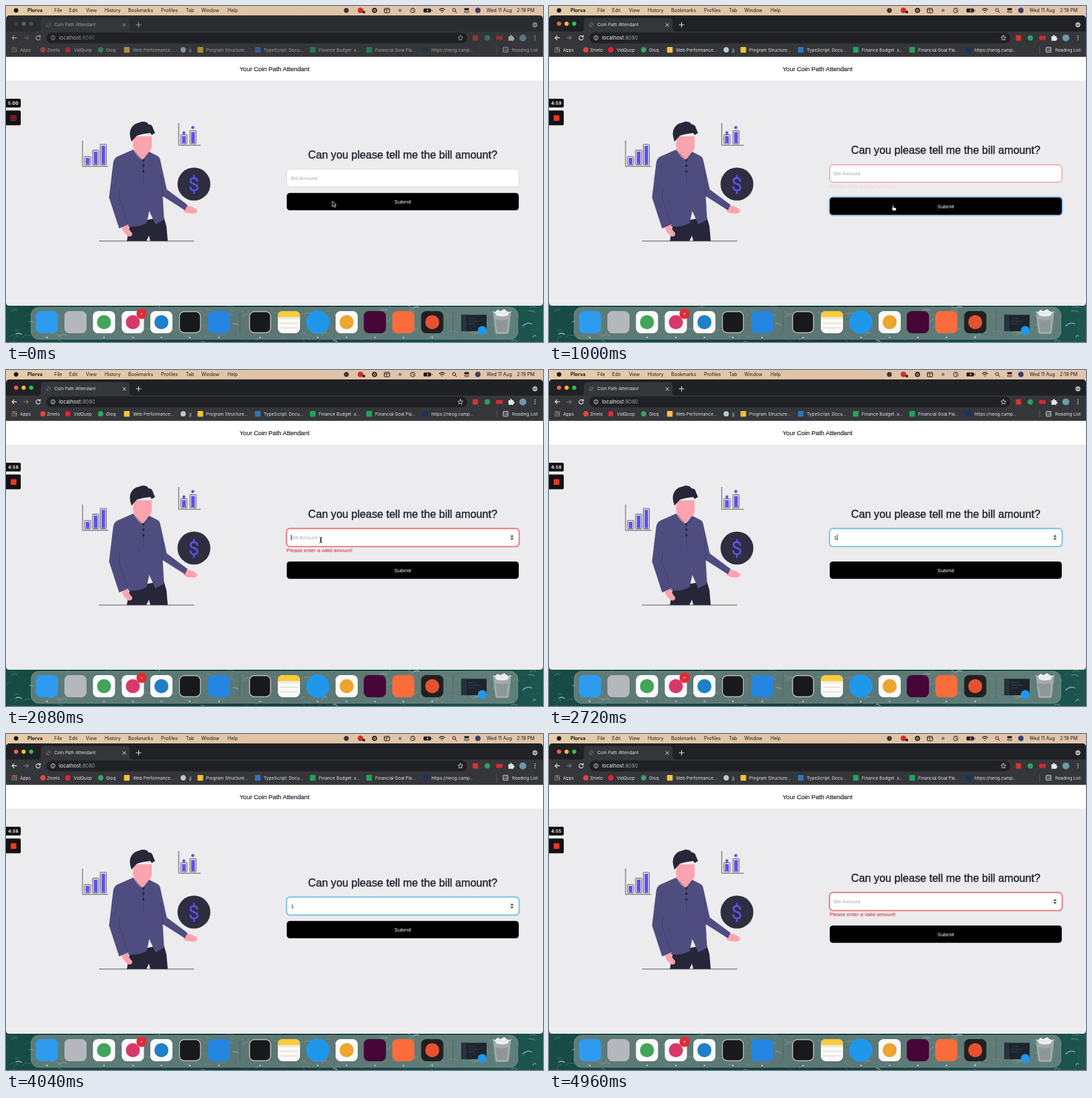
An HTML page for the animation above (5 s loop, 800 by 500 pixels).

```html
<!DOCTYPE html>
<html lang="en">
<head>
<meta charset="utf-8">
<title>Bill form demo</title>
<style>
  html, body { margin: 0; width: 800px; height: 500px; overflow: hidden; background: #123c38; }
  svg { display: block; }
  .ui { font-family: Inter, sans-serif; }
  .page { font-family: "Liberation Sans", Arial, sans-serif; font-size: 7.9px; }
  .line { fill: none; stroke-linecap: round; stroke-linejoin: round; }
  text { white-space: pre; }
</style>
</head>
<body>
<svg id="stage" width="800" height="500" viewBox="0 0 800 500"></svg>
<script>
const LOOP = 5000;
const stage = document.getElementById('stage');

let seed = 11;
const random = () => (seed = seed * 16807 % 2147483647) / 2147483647;

const rect = (x, y, w, h, fill, r = 0, more = '') =>
  `<rect x="${x}" y="${y}" width="${w}" height="${h}" rx="${r}" fill="${fill}" ${more}/>`;
const circle = (x, y, r, fill, more = '') => `<circle cx="${x}" cy="${y}" r="${r}" fill="${fill}" ${more}/>`;
const text = (x, y, str, size, fill, more = '') =>
  `<text x="${x}" y="${y}" font-size="${size}" fill="${fill}" ${more}>${str}</text>`;
const line = (d, stroke, width = 1, more = '') =>
  `<path class="line" d="${d}" stroke="${stroke}" stroke-width="${width}" ${more}/>`;
const shape = (d, fill, more = '') => `<path d="${d}" fill="${fill}" ${more}/>`;
const MIDDLE = 'text-anchor="middle"';

function ocean() {
  let out = rect(0, 430, 800, 70, 'url(#sea)');
  for (let i = 0; i < 260; i++) {
    const x = random() * 800, y = 444 + random() * 56, w = 3 + random() * 11;
    const rise = random() * 8 - 4;
    out += line(`M${x} ${y}q${w / 2} ${rise - 3} ${w} ${rise}`, random() < .4 ? '#cfdfda' : '#3f7a70',
      .4 + random() * 1.2, `opacity="${.2 + random() * .5}"`);
  }
  return out;
}

function menuBar() {
  const items = [[72, 'File'], [94, 'Edit'], [119, 'View'], [147, 'History'], [182, 'Bookmarks'],
    [231, 'Profiles'], [268, 'Tab'], [291, 'Window'], [330, 'Help']];
  const ink = '#1c1816';
  return `<g class="ui">${rect(0, 0, 800, 20, 'url(#menu)')}
    ${circle(15, 6.6, 3.3, ink)}${text(32, 9.3, 'Plorva', 7.2, ink, 'font-weight="700"')}
    ${items.map(([x, s]) => text(x, 9.3, s, 7, ink)).join('')}
    ${circle(507, 6.6, 3.6, '#3b3532')}
    ${circle(528, 6.6, 4, '#d22b2b')}${circle(533, 9, 2, ink)}
    ${circle(549, 6.6, 3, 'none', `stroke="${ink}" stroke-width="1.6"`)}${circle(549, 6.6, 1.2, ink)}
    ${rect(563.5, 3.5, 8, 6.5, 'none', 1, `stroke="${ink}"`)}${line('M563.5 5.5h8M567 5.5v4', ink, .8)}
    ${circle(587, 6.6, 2.4, '#8d7b6d')}
    ${circle(606, 6.6, 3.4, 'none', `stroke="${ink}" stroke-width=".9"`)}${line('M606 4.6v2l1.5 1', ink, .8)}
    ${rect(622, 3.8, 11, 5.8, ink, 1.4)}${rect(634, 5.7, 1, 2, ink)}${shape('M628.6 4.3l-2.2 2.8h1.6l-.5 2.2 2.2-3h-1.5z', '#e3d0b5')}
    ${line('M645.5 5.4q4-3.6 8 0M647.2 7.2q2.3-2 4.6 0', ink, 1.1)}${circle(649.5, 9, .8, ink)}
    ${circle(667.5, 6, 2.3, 'none', `stroke="${ink}" stroke-width=".9"`)}${line('M669.3 7.9l2 2', ink, 1)}
    ${rect(682.5, 3.3, 7.5, 2.8, ink, 1.4)}${rect(682.9, 7.4, 6.7, 2.3, 'none', 1.2, `stroke="${ink}" stroke-width=".8"`)}
    ${circle(703, 6.6, 4, '#3a3f72')}
    ${text(716, 9.3, 'Wed 11 Aug', 7, ink)}${text(761, 9.3, '2:19 PM', 7, ink)}</g>`;
}

function browser() {
  const pale = '#e4e6e9', grey = '#9aa0a6';
  const bookmarks = [[55, '#e0483c', 61, 'Zmelo', 1], [92, '#f2203a', 101, 'VidQuop', 1], [141, '#35a665', 149, 'Gloq', 1],
    [180, '#f4c245', 189, 'Web Performance...'], [264, '#b9cbd8', 273, 'jj', 1], [289.5, '#f0c22c', 298, 'Program Structure...'],
    [375, '#2f74c0', 384, 'TypeScript: Docu...'], [457, '#20a35a', 466, 'Finance Budget .x...'],
    [541, '#20a35a', 550, 'Financial Goal Pla...'], [625, '#17345f', 634, 'https://neog.camp...']];
  let grid = '';
  for (let i = 0; i < 9; i++)
    grid += rect(8.5 + i % 3 * 2.9, 61.5 + Math.floor(i / 3) * 2.9, 1.9, 1.9, ['#e8574a', '#eab83c', '#4a9a63', '#4f87e0'][i % 4]);
  return `${rect(0, 14, 800, 432, '#202124', 5, 'id="frame"')}
    ${shape('M47 38q5 0 5-5v-10q0-5 5-5h122q5 0 5 5v10q0 5 5 5z', '#35363a')}
    ${rect(0, 38, 800, 38, '#35363a')}${rect(60, 39.5, 627, 16, '#202124', 8)}
    <g id="lights">${circle(15, 26.3, 3.1, '#ff5f57')}${circle(26.3, 26.3, 3.1, '#febc2e')}${circle(37.5, 26.3, 3.1, '#28c840')}</g>
    <g class="ui" id="toolbar">
    ${circle(63, 28, 3.7, '#54575b')}${line('M60 27l2-1 1 2 2 1-1 2', '#2a2b2e', 1)}
    ${text(72, 30.4, 'Coin Path Attendant', 6.5, pale)}
    ${line('M174 26l4.4 4.4m0-4.4l-4.4 4.4', pale, .9)}${line('M194 28h7m-3.5-3.5v7', pale, 1)}
    ${circle(788, 28, 3.7, '#b6b8bb')}${line('M786.2 27.4l1.8 1.7 1.8-1.7', '#202124', .9)}
    ${line('M15.7 47.4h-6.7m3-3l-3 3 3 3', pale, 1.1)}${line('M26.7 47.4h6.7m-3-3l3 3-3 3', grey, 1.1, 'opacity=".6"')}
    ${line('M50.3 45.2a3.2 3.2 0 1 0 .8 2.8M51 43.6v2.4h-2.5', pale, 1.1)}
    ${circle(70, 47.4, 3.1, 'none', `stroke="${pale}" stroke-width=".8"`)}${line('M70 47.2v1.8M70 45.7v.1', pale, .9)}
    ${text(79, 50, `localhost<tspan fill="${grey}">:8080</tspan>`, 7.6, '#f1f3f4')}
    ${line('M677 43.8l1.1 2.4 2.6.3-1.9 1.8.5 2.5-2.3-1.2-2.3 1.2.5-2.5-1.9-1.8 2.6-.3z', pale, .8)}
    ${rect(695.3, 43.5, 8, 8, '#d9342b', 1)}${circle(717, 47.4, 4, '#2e9e63')}${rect(730, 44.5, 10, 6, '#d72a2f', 2)}
    ${shape('M748.5 45h2.4q-.3-2 1.3-2t1.3 2h2.5v2.4q1.8-.2 1.8 1.2t-1.8 1.2v2h-7.5z', pale)}
    ${circle(770, 47.4, 5.2, '#6c9aab')}
    ${[44.5, 47.4, 50.3].map(y => circle(788, y, .8, pale)).join('')}
    ${grid}${text(21, 67.7, 'Apps', 6.6, pale)}
    ${bookmarks.map(([icon, fill, x, s, round]) =>
      (round ? circle(icon, 65.2, 3.9, fill) : rect(icon - 4.2, 61, 8.4, 8.4, fill, 1)) + text(x, 67.7, s, 6.55, pale)).join('')}
    ${line('M731 60.5v10', '#5f6368', .8)}${rect(740.7, 61.5, 7.2, 7.4, 'none', .6, `stroke="${pale}" stroke-width=".9"`)}
    ${line('M742 64h.5M744 64h2.5M742 66.5h.5M744 66.5h2.5', pale, .8)}${text(754, 67.7, 'Reading List', 6.6, pale)}
    </g>
    ${rect(0, 75.7, 800, 36, '#fff')}${shape('M0 111h800v330q0 5-5 5h-790q-5 0-5-5z', '#ecebed')}
    <g class="page">${text(400, 96.8, 'Your Coin Path Attendant', 9.3, '#1a202c', `${MIDDLE} stroke="#1a202c" stroke-width=".2"`)}</g>`;
}

function illustration() {
  const dark = '#272638', cloth = '#4f4d7f', skin = '#fba3ae', violet = '#5e50ea';
  const bar = (x, y, w, bottom) => rect(x, y, w, bottom - y, 'none', .8, 'stroke="#34334a" stroke-width=".8"')
    + rect(x + 1.8, y + 2, w - 3.6, bottom - y - 3, violet);
  return `${line('M139 349.8h141', '#4a4957', .9)}
    ${line('M114 200.5v38.2h38M257.3 174.5v32.7h32.5', '#4a4957', .9)}
    ${bar(117, 224, 9, 236.5)}${bar(129, 214.5, 9, 236.5)}${bar(140.5, 206, 9, 236.5)}
    ${bar(260.5, 191.5, 9.2, 205)}${bar(274, 185.5, 9.2, 205)}
    ${circle(265, 188.7, 2.2, violet)}${circle(278.3, 180.8, 2.3, violet)}
    ${shape('M180 349.8l5-27 50-9 4 14 2 22h-26l-2-8-4 8z', dark)}
    ${shape('M172 329l9-4q1 7 7 13 1 5-5 5-7-3-11-14z', skin)}
    ${shape('M266 300l5-3q10 2 14 7 0 5-7 5t-13-3z', skin)}
    ${shape('M191 194h26v15q0 5-3 7l2 5q-4 8-10 9-9-3-15-15l-2-8z', skin)}
    ${shape('M191 213l-25 11q-6 3-6.5 11l-6 50 15 46 14-6-1 3q16 2 28-5l4-18 9 20 13-7-2-35 33 21 4-8-31-23-10-45q-1-4-6-6l-10-5-2 2q-6 9-9 10-7-5-13-15z', cloth)}
    ${line('M170 271l-2 13 13 39M190 215l14 15 11-11M204 230l1 35M231 250l3 33', '#393861', .7)}
    ${[229.5, 237.5, 246].map(y => circle(204.7, y, 1.7, dark)).join('')}
    ${shape('M187 202q-5-14 0-21 4-6 10-7l6-2q8 0 9 4 6 0 7 6l3 7-5 3-2-3q-12 1-20 4-4 4-8 9z', dark)}
    ${circle(280, 265, 24.5, '#2f2e41')}
    ${line('M285 260.5q-1-4.3-5-4.3-5 0-5 4 0 3.3 5 4.7 5.3 1.5 5.3 5 0 4.2-5.3 4.2-4.7 0-5.4-4.5M280 252.5v3.5M280 274.5v4', violet, 2.7)}`;
}

function recorder() {
  return `<g class="ui">${shape('M0 138h20q2 0 2 2v9q0 2-2 2h-20z', '#121214')}
    ${text(11, 146.8, '', 6.2, '#fff', `${MIDDLE} id="timer" font-weight="700" letter-spacing=".4"`)}
    ${shape('M0 155.5h20q2 0 2 2v18q0 2-2 2h-20z', '#121214')}
    ${rect(7, 162.5, 8.5, 8.5, '#f03524', 1, 'id="stop"')}
    ${line('M7.5 163h7.5v7.5h-7.5zM10 163v7.5M12.5 163v7.5M7.5 165.5h7.5M7.5 168h7.5', '#a82d3c', .9, 'id="starting"')}</g>`;
}

function form() {
  const ink = '#1a202c';
  return `<g class="page">
    ${text(591, 227, 'Can you please tell me the bill amount?', 16.1, ink, `id="heading" ${MIDDLE} stroke="${ink}" stroke-width=".35"`)}
    <g id="input">${rect(417.6, 242.3, 347.2, 27.4, 'none', 5.5, 'id="halo" stroke-width="1.6" opacity=".55"')}
      ${rect(418.3, 243, 345.8, 26, '#fff', 5, 'id="field" stroke-width=".9"')}
      ${text(424.6, 258.8, '', 7.9, ink, 'id="value"')}${rect(424.5, 251.5, .8, 9, '#111', 0, 'id="caret"')}
      <g id="spinner">${rect(750, 251, 7.5, 10, '#ececee', 2)}${shape('M751.8 255l2-2.8 2 2.8zM751.8 257l2 2.8 2-2.8z', '#333')}</g></g>
    ${text(418, 271.2, 'Please enter a valid amount!', 7.75, '#dc1c28', 'id="error"')}
    <g id="button">${rect(417.7, 277.7, 346.8, 26.9, 'none', 5, 'id="ring" stroke="#8fc4f2" stroke-width="2.2"')}
      ${rect(418.3, 278.3, 345.6, 25.7, '#000', 4.5)}
      ${text(591, 294, 'Submit', 8, '#fff', MIDDLE)}</g></g>`;
}

function dock() {
  const tile = (x, fill, mark) => rect(x - 16.5, 454, 33, 33, fill, 7.5) + (mark ? circle(x, 470.5, 10.5, mark) : '');
  const tiles = [[61, '#2d9bef'], [103.5, '#b4b8bd'], [146, '#fafafa', '#43a45b'], [189, '#fafafa', '#d9386a'],
    [231.5, '#fafafa', '#1f7fc9'], [274, '#17191b'], [317.5, '#2486e0'], [378.5, '#17191b'],
    [507.5, '#fafafa', '#eca52f'], [549.5, '#460638'], [592, '#fb6c3c'], [635, '#202022', '#e8512f']];
  const running = tiles.map(t => t[0]).filter(x => x !== 103.5).concat(464.5);
  return `${rect(37.5, 448.5, 725, 47.5, '#81938f', 11, 'opacity=".68" stroke="#b4c0bd" stroke-width=".7"')}
    ${tiles.map(t => tile(...t)).join('')}
    ${[274, 378.5].map(x => rect(x - 15.7, 454.8, 31.4, 31.4, 'none', 7, 'stroke="#b7babb" stroke-width="1.6"')).join('')}
    ${circle(464.5, 470.5, 17.5, '#1f98ec')}
    ${tile(421.5, '#fbfaf5')}${shape('M405 463v-2q0-7 7.5-7h18q7.5 0 7.5 7v2z', '#f8cb3a')}
    ${line('M405 465h33M408 472h27M408 479h27', '#c9c6bd', .8)}
    ${circle(202, 458, 7.7, '#e42a36')}${circle(202, 458, 1, '#fff')}
    ${line('M348.5 454v33M666 454v33', '#506460', .8)}
    ${rect(678, 459.5, 38, 24.5, '#1c242d', 1)}${rect(678, 459.5, 8, 24.5, '#28323d', 1)}
    ${line('M689 465h11M689 469h16M689 473h9', '#455462', .7)}${circle(709.5, 483, 6.8, '#1f98ec')}
    ${shape('M725.5 455h27l-3.5 31q-.5 2-3 2h-14q-2.5 0-3-2z', '#a9b0b2', 'opacity=".9"')}
    ${shape('M728 456l4-4 5 2 5-3 4 3 4 2-3 5-8 1-8-1z', '#eef0f0')}${shape('M729 466l9 2 10-2-2 19h-14z', '#7d8789', 'opacity=".55"')}
    ${line('M725.5 455q13.5 4 27 0', '#dfe3e4', 1.2)}
    ${running.map(x => circle(x, 493.3, 1, '#e4ebe9')).join('')}`;
}

const pointers = {
  arrow: shape('M0 0v8l2-1.8 1.4 3 1.5-.7-1.4-2.9h2.7z', '#111', 'stroke="#fff" stroke-width=".7"'),
  hand: shape('M-1.3 .8q0-1 .8-1t.8 1v2.3l3.3.8q1 .3.8 1.5l-.6 2.8h-4.2l-2.3-3.2q.4-1.2 1.4-.3z', '#fff', 'stroke="#111" stroke-width=".8"'),
  beam: line('M-1.7-4q1.7 0 1.7 1v6q0 1-1.7 1M1.7-4q-1.7 0-1.7 1v6q0 1 1.7 1M-1 .8h2', '#111', .9)
};

stage.innerHTML = `<defs>
  <linearGradient id="sea"><stop stop-color="#174c45"/><stop offset=".5" stop-color="#0f3a39"/><stop offset="1" stop-color="#1c564e"/></linearGradient>
  <linearGradient id="menu"><stop stop-color="#e5cda9"/><stop offset=".5" stop-color="#dfc3a6"/><stop offset="1" stop-color="#e2c5ac"/></linearGradient>
  </defs>` + ocean() + menuBar() + browser() + illustration() + recorder() + form() + dock()
  + Object.entries(pointers).map(([id, art]) => `<g id="${id}">${art}</g>`).join('');

const el = id => document.getElementById(id);
const set = (id, name, value) => el(id).setAttribute(name, value);
const show = (id, on) => set(id, 'visibility', on ? 'visible' : 'hidden');
const ramp = (t, from, to) => Math.min(1, Math.max(0, (t - from) / (to - from)));
const ease = p => p * p * (3 - 2 * p);

// Each keystroke: time and resulting field value.
const keys = [[2650, '1'], [3000, '12'], [3450, '1'], [4400, '']];
const ACTIVATE = 600, SUBMIT = 930, FOCUS = 2000, RELAYOUT = 2800;

function draw(t) {
  const active = t >= ACTIVATE, focused = t >= FOCUS;
  const [keyTime, value] = keys.filter(k => k[0] <= t).pop() || [FOCUS, ''];
  const invalid = t >= SUBMIT && value === '';
  const expanded = (t >= SUBMIT && t < RELAYOUT) || t >= keys[3][0];

  set('frame', 'fill', active ? '#202124' : '#2b2c2f');
  set('toolbar', 'opacity', active ? 1 : .62);
  set('lights', 'style', active ? '' : 'filter:grayscale(1) brightness(.5)');
  el('timer').textContent = t < 850 ? '5:00' : '4:' + (59 - Math.floor((t - 850) / 1000));
  show('starting', t < 400);
  show('stop', t >= 400);

  const shift = expanded ? 6.7 : 0;
  set('heading', 'transform', `translate(0 ${-shift})`);
  set('input', 'transform', `translate(0 ${-shift})`);
  set('button', 'transform', `translate(0 ${shift})`);
  show('ring', t >= SUBMIT && !focused);
  show('halo', focused);
  set('halo', 'stroke', invalid ? '#e8343e' : '#4fa9dc');
  set('field', 'stroke', invalid ? '#ea6b72' : focused ? '#63b3e4' : '#dcdfe5');
  show('spinner', focused);
  el('value').textContent = value || 'Bill Amount';
  set('value', 'fill', value ? '#1a202c' : '#a9abb2');
  show('caret', focused && (t - keyTime) % 1000 < 500);
  set('caret', 'x', 424.5 + value.length * 4.4);
  const fadeStart = t < RELAYOUT ? 975 : 4420;
  set('error', 'opacity', invalid ? ramp(t, fadeStart, fadeStart + 240) : 0);

  const toButton = ease(ramp(t, 100, 600)), toField = ease(ramp(t, 1250, 1850));
  const x = 486 + 27 * toButton - 44 * toField;
  const y = 290.5 + 6 * toButton - 43.5 * toField;
  const kind = !active ? 'arrow' : y > 285 ? 'hand' : y > 263 ? 'arrow' : 'beam';
  for (const id in pointers) {
    show(id, id === kind && t < keys[0][0]);
    set(id, 'transform', `translate(${x} ${y})`);
  }
}

const start = performance.now();
function tick() {
  draw((performance.now() - start) % LOOP);
  requestAnimationFrame(tick);
}
tick();
</script>
</body>
</html>
```
